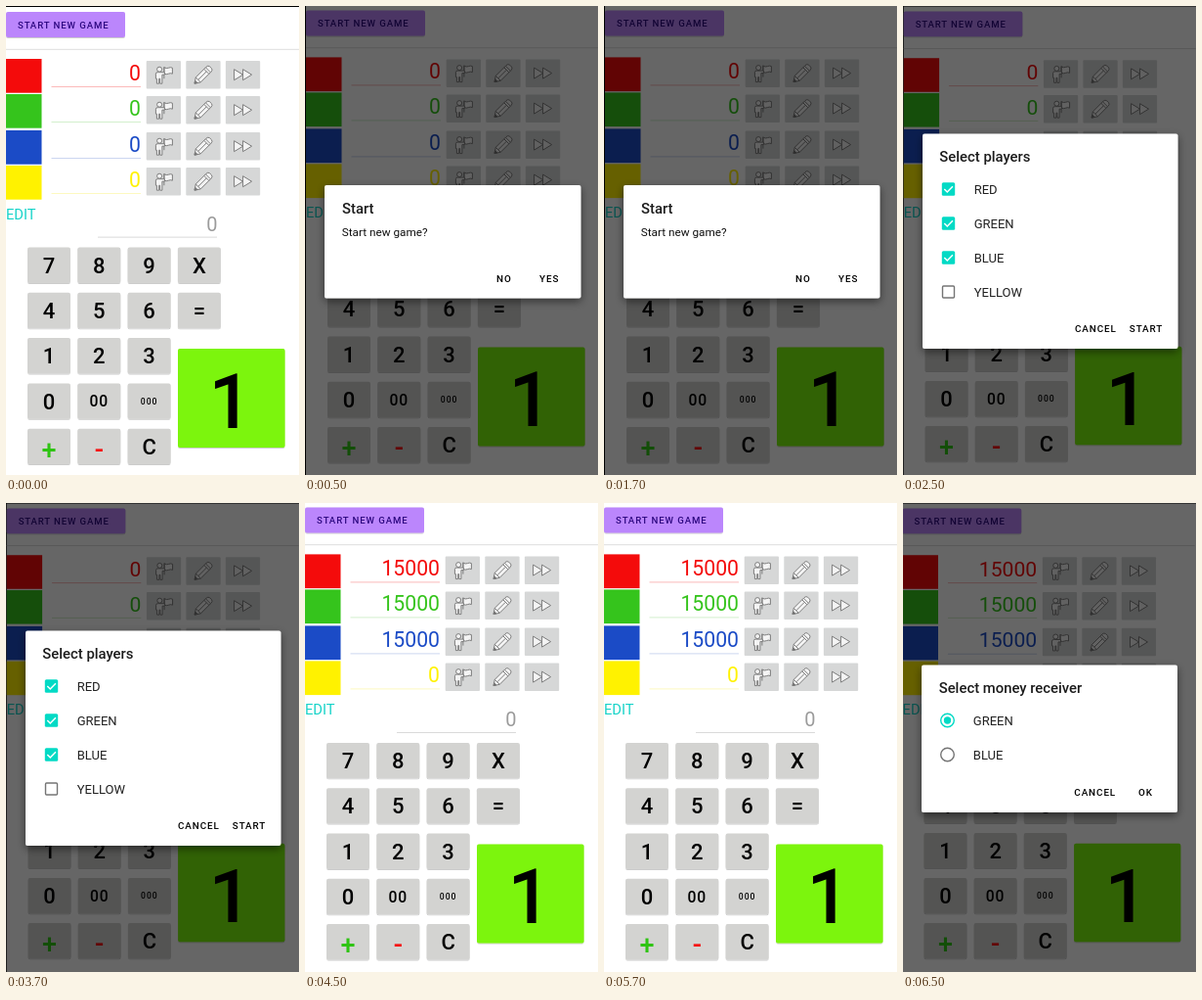
Write an HTML page that moves like this. It is 300 px wide and 479 px high and loops after 8000 ms.

```html
<!DOCTYPE html>
<html lang="en">
<head>
<meta charset="utf-8">
<title>Score keeper</title>
<style>
html, body { margin: 0; width: 100%; height: 100%; overflow: hidden; background: #000; }
svg { display: block; width: 100vw; height: 100vh; font-family: Roboto, Arial, sans-serif; }
.medium { font-weight: 500; }
.button { font-weight: 500; letter-spacing: .9px; }
.icon { fill: #f4f4f4; stroke: #7d7d7d; stroke-width: 1; stroke-linejoin: round; }
</style>
</head>
<body>
<svg id="stage" viewBox="0 0 300 479" preserveAspectRatio="none">
  <defs>
    <filter id="lift" x="-10%" y="-10%" width="120%" height="130%">
      <feDropShadow dx="0" dy=".8" stdDeviation=".7" flood-opacity=".25"/>
    </filter>
    <filter id="float" x="-10%" y="-15%" width="120%" height="135%">
      <feDropShadow dx="0" dy="3" stdDeviation="4.5" flood-opacity=".5"/>
    </filter>
    <g id="person" class="icon">
      <path d="M10.5 2.5Q13 4 15 3T19 3V9Q17 8 15 9T10.5 9Z"/>
      <path d="M10.5 2V14" fill="none"/>
      <path d="M2 9Q2 7.5 4 7.5H11V10H8.5V19H6.3V14H5.3V19H3V14H2Z"/>
      <circle cx="5.7" cy="4.5" r="2.5"/>
    </g>
    <g id="pencil" class="icon">
      <path d="M1 19L2.3 12.7L13 2Q14.8 .2 16.6 1.6L18.5 3.5Q19.8 5.2 18 7L7.3 17.7Z"/>
      <path d="M2.3 12.7L7.3 17.7M10.8 4.2L15.8 9.2M12.4 2.6L17.4 7.6M4.8 15.2L13.3 6.7" fill="none"/>
      <path d="M1 19L1.7 16L4 18.3Z" fill="#666"/>
    </g>
    <path id="skip" class="icon" d="M1 4.5L10 10L1 15.5ZM10 4.5L19 10L10 15.5Z"/>
  </defs>
  <g id="board"></g>
  <rect id="dim" width="300" height="479" fill="#000" fill-opacity=".6"/>
  <g id="dialog"></g>
</svg>
<script>
const LOOP = 8000;
const PLAYERS = [
  ["#f40b0b", "#fbb9b9"], ["#35c41c", "#d3efcd"],
  ["#1b4bc6", "#ccd6f0"], ["#fff200", "#fdf9c0"]
];
const TEAL = "#03dac5";
const board = document.getElementById("board");
const dim = document.getElementById("dim");
const dialog = document.getElementById("dialog");

const rect = (x, y, w, h, fill, extra = "") =>
  `<rect x="${x}" y="${y}" width="${w}" height="${h}" fill="${fill}" ${extra}/>`;
const text = (x, y, size, label, extra = "") =>
  `<text x="${x}" y="${y}" font-size="${size}" ${extra}>${label}</text>`;
const button = (x, y, label, fill = "#000", size = 9.9) =>
  text(x, y, size, label, `class="button" fill="${fill}"`);
const raised = 'rx="2" filter="url(#lift)"';
const right = 'text-anchor="end"';
const middle = 'class="medium" text-anchor="middle"';

function playerRow([color, line], i, score) {
  const y = Math.floor(54 + i * 36.6);
  const icons = ["person", "pencil", "skip"].map((id, k) => {
    const x = 143.7 + k * 40.6;
    return rect(x, y + 2, 35.3, 28.6, "#d6d7d7", 'rx="1"') +
      `<use href="#${id}" x="${x + 7.7}" y="${y + 6.2}"/>`;
  }).join("");
  return rect(0, y, 36.5, 34.7, color) +
    text(138, y + 21.6, 21.2, score, `fill="${color}" ${right}`) +
    rect(46.5, y + 28, 91.5, 1, line) + icons;
}

function key(label, col, row) {
  const x = 22 + col * 51.3, y = 246.5 + row * 46.3;
  const size = { "00": 15.7, "000": 8.7, "+": 27, "-": 28 }[label] || 22;
  const drop = { "00": 5.7, "000": 3.2, "+": 12.7, "-": 12.2 }[label] || 7.9;
  const fill = { "+": "#2fc414", "-": "#f51212" }[label] || "#000";
  const space = label[1] ? 'letter-spacing=".9"' : "";
  return rect(x, y, 44, 36.4, "#d3d3d1", raised) +
    text(x + 22, y + 18.2 + drop, size, label, `${middle} fill="${fill}" ${space}`);
}

function drawBoard(scores) {
  const keys = ["7 8 9 X", "4 5 6 =", "1 2 3", "0 00 000", "+ - C"];
  return rect(0, 1, 310, 490, "#fff") +
    rect(0, 6, 122, 26, "#bb86fc", raised) +
    button(12, 22.5, "START NEW GAME", "#2d0880", 9.6) +
    rect(0, 43.8, 300, 1, "#dedede") +
    PLAYERS.map((p, i) => playerRow(p, i, scores[i])).join("") +
    text(0, 217.8, 14.7, "EDIT", 'fill="#14d3c8"') +
    text(216.5, 230, 20, "0", `fill="#9b9b9b" ${right}`) +
    rect(94, 235.6, 122, 1, "#dadada") +
    keys.map((line, r) => line.split(" ").map((k, c) => key(k, c, r)).join("")).join("") +
    rect(176, 350, 109.6, 101, "#7cf508", raised) +
    text(229.6, 431, 77, "1", middle);
}

const panel = (x, y, w, h) => rect(x, y, w, h, "#fff", 'rx="2" filter="url(#float)"');
const title = (x, y, label) => text(x, y, 14.85, label, 'class="medium" fill="#1c1c1c"');
const option = (x, y, label) => text(x, y, 13, label, 'fill="#222"');

function checkbox(y, label, on) {
  const box = on
    ? rect(39.8, y - 6.7, 13.4, 13.4, TEAL, 'rx="1.5"') +
      `<path d="M42.3 ${y}l3 3l5.6-5.8" fill="none" stroke="#fff" stroke-width="1.5"/>`
    : rect(40.5, y - 6, 12, 12, "none", 'rx="1" stroke="#757575" stroke-width="1.4"');
  return box + option(72.7, y + 4.6, label);
}

function radio(y, label, on) {
  const color = on ? TEAL : "#757575";
  return `<circle cx="45.5" cy="${y}" r="6.8" fill="none" stroke="${color}" stroke-width="1.4"/>` +
    (on ? `<circle cx="45.5" cy="${y}" r="3.7" fill="${color}"/>` : "") +
    option(71.8, y + 4.8, label);
}

const confirmNew = panel(20, 183, 262.5, 115.5) + title(38, 212, "Start") +
  text(37.7, 234.6, 11.75, "Start new game?", 'fill="#111"') +
  button(196, 282, "NO") + button(240, 282, "YES");

const choosePlayers = panel(20, 130.5, 261.5, 219.5) + title(37.3, 159.3, "Select players") +
  ["RED", "GREEN", "BLUE", "YELLOW"].map((n, i) => checkbox(187 + i * 35, n, i < 3)).join("") +
  button(176, 333.2, "CANCEL") + button(231.8, 333.2, "START");

const chooseReceiver = panel(19, 165.5, 262, 150.5) + title(36.7, 194, "Select money receiver") +
  radio(222, "GREEN", true) + radio(257, "BLUE", false) +
  button(175.3, 298.7, "CANCEL") + button(241, 298.7, "OK");

const empty = [0, 0, 0, 0], dealt = [15000, 15000, 15000, 0];
// place: x, y, scale x, scale y of the board
const scenes = [
  { start: 0, scores: empty, place: [0, 0, 1, 1], popup: "" },
  { start: 500, scores: empty, place: [1, -1.6, 1, 1], popup: confirmNew },
  { start: 2500, scores: empty, place: [.7, -.5, .997, .995], popup: choosePlayers },
  { start: 4500, scores: dealt, place: [0, -1.6, 1, 1], popup: "" },
  { start: 6500, scores: dealt, place: [-.4, -.5, .997, .995], popup: chooseReceiver }
];

let shown;
function draw(time) {
  const scene = scenes.findLast(s => s.start <= time);
  if (scene === shown) return;
  shown = scene;
  const [x, y, sx, sy] = scene.place;
  board.innerHTML = drawBoard(scene.scores);
  board.setAttribute("transform", `translate(${x} ${y}) scale(${sx} ${sy})`);
  dim.style.display = scene.popup ? "" : "none";
  dialog.innerHTML = scene.popup;
}

const origin = performance.now();
function tick() {
  draw((performance.now() - origin) % LOOP);
  requestAnimationFrame(tick);
}
tick();
</script>
</body>
</html>
```
